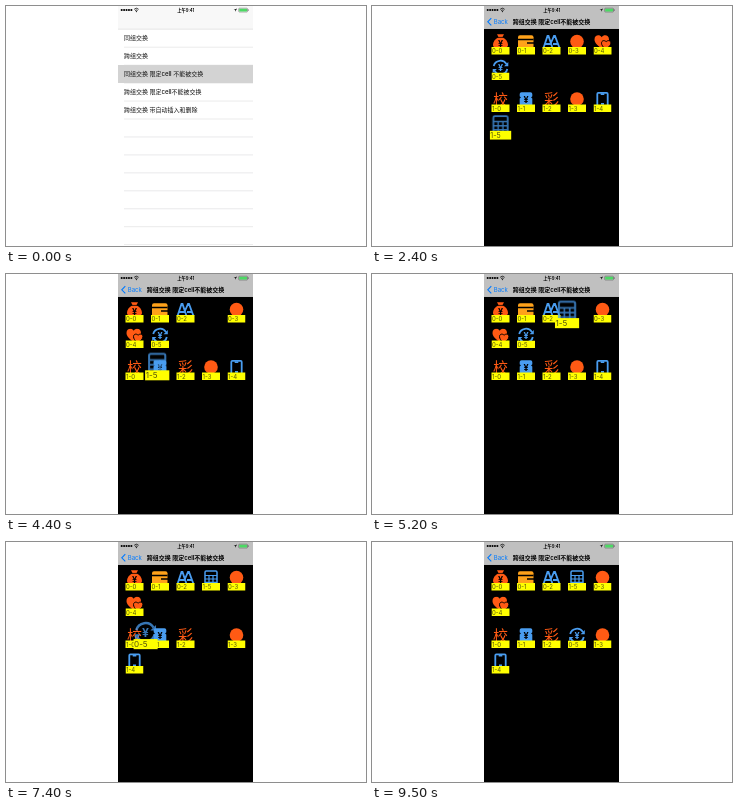
Write an HTML page that moves like this. It is 360x240 px and loops after 9600 ms.

```html
<!DOCTYPE html>
<html lang="zh-Hans">
<head>
<meta charset="utf-8">
<title>Cell reordering</title>
<style>
  html, body { margin: 0; width: 100%; height: 100%; overflow: hidden; background: #fff; }
  body > svg { display: block; width: 360px; height: 240px; }
  text { font-family: Inter, "Noto Sans CJK SC", "Noto Sans CJK", sans-serif; font-size: 6px; }
  .row { font-weight: 500; fill: #111; }
  .title { font-weight: 600; text-anchor: middle; }
  .time { font-size: 4.3px; font-weight: 600; text-anchor: middle; }
  .label { fill: #55550c; }
  .yen { font-size: 9px; font-weight: 700; text-anchor: middle; }
  .glyph { font-size: 15px; font-weight: 500; text-anchor: middle; }
  .orange { fill: #ff5a14; }
  .amber { fill: #ffa21a; }
  .blue { fill: #4a9df0; }
  .line { fill: none; stroke: #4a9df0; stroke-width: 1.8; }

  .list, .page, .bar, .lit, .tapped, .moving, .moving .icon {
    animation: 9.6s linear infinite;
  }
  .lit { animation-name: unlight; }
  .tapped { animation-name: tap; }
  .list { animation-name: leave; }
  .page { animation-name: enter; }
  .bar { animation-name: barIn; }
  @keyframes unlight { 0% { opacity: 1 } 3.1%, 100% { opacity: 0 } }
  @keyframes tap { 0%, 3.1% { opacity: 0 } 3.12%, 100% { opacity: 1 } }
  @keyframes leave {
    0%, 3.65% { transform: none; animation-timing-function: cubic-bezier(.25,.8,.3,1) }
    8.85%, 100% { transform: translate(-40px, 0) }
  }
  @keyframes enter {
    0%, 3.65% { transform: translate(135px, 0); animation-timing-function: cubic-bezier(.25,.8,.3,1) }
    8.85%, 100% { transform: none }
  }
  @keyframes barIn {
    0%, 3.65% { transform: translate(60px, 0); opacity: 0; animation-timing-function: cubic-bezier(.25,.8,.3,1) }
    8.85%, 100% { transform: none; opacity: 1 }
  }

  /* neighbours making room */
  .m03 { animation-name: m03; }
  .m04 { animation-name: m04; }
  .m13 { animation-name: m13; }
  .m14 { animation-name: m14; }
  @keyframes m03 {
    0%, 31.25% { transform: translate(205px, 38px); animation-timing-function: ease-in-out }
    33.85%, 100% { transform: translate(230.5px, 38px) }
  }
  @keyframes m04 {
    0%, 31.25% { transform: translate(230.5px, 38px); animation-timing-function: ease-in-out }
    33.85%, 100% { transform: translate(128.5px, 63.5px) }
  }
  @keyframes m13 {
    0%, 71.35% { transform: translate(205px, 95.5px); animation-timing-function: ease-in-out }
    73.96%, 100% { transform: translate(230.5px, 95.5px) }
  }
  @keyframes m14 {
    0%, 71.35% { transform: translate(230.5px, 95.5px); animation-timing-function: ease-in-out }
    73.96%, 100% { transform: translate(128.5px, 121px) }
  }

  /* dragged cells */
  .m15 { animation-name: m15; }
  .m15 .icon { animation-name: dim15; }
  .m05 { animation-name: m05; }
  .m05 .icon { animation-name: dim05; }
  .m15, .m05 { animation-timing-function: ease-in-out; }
  @keyframes m15 {
    0%, 23.54% { transform: translate(128.5px, 121px) scale(1); animation-timing-function: linear }
    26.15% { transform: translate(128.5px, 121px) scale(1.35) }
    31.25% { transform: translate(198px, 48px) scale(1.35) }
    33.33% { transform: translate(200px, 43px) scale(1.35) }
    37.5% { transform: translate(158px, 60.3px) scale(1.35) }
    41.67% { transform: translate(142px, 48px) scale(1.35) }
    46.88% { transform: translate(152px, 96px) scale(1.35) }
    51.04% { transform: translate(186px, 58px) scale(1.35) }
    54.17%, 55.2% { transform: translate(195px, 40px) scale(1.35) }
    57.3%, 100% { transform: translate(205px, 38px) scale(1) }
  }
  @keyframes dim15 {
    0%, 23.54% { opacity: 1 }
    25%, 55.2% { opacity: .75 }
    57.3%, 100% { opacity: 1 }
  }
  @keyframes m05 {
    0%, 31.25% { transform: translate(128.5px, 63.5px) scale(1) }
    33.85%, 62.5% { transform: translate(154px, 63.5px) scale(1) }
    65.1% { transform: translate(154px, 63.5px) scale(1.35) }
    71.35% { transform: translate(201px, 91px) scale(1.35) }
    72.92% { transform: translate(200px, 95px) scale(1.35) }
    77.08% { transform: translate(139.5px, 93px) scale(1.35) }
    81.77% { transform: translate(152px, 108px) scale(1.35) }
    87.5% { transform: translate(178px, 92px) scale(1.35) }
    91.67%, 93.75% { transform: translate(200px, 95px) scale(1.35) }
    95.83%, 100% { transform: translate(205px, 95.5px) scale(1) }
  }
  @keyframes dim05 {
    0%, 62.5% { opacity: 1 }
    65.1%, 93.75% { opacity: .75 }
    95.83%, 100% { opacity: 1 }
  }
</style>
</head>
<body>
<svg viewBox="0 0 360 240">
  <defs>
    <g id="i00">
      <path class="orange" d="M-3.5-9.8h7l-1.6 3C5.5-5.2 7.5-2 7.5.8 7.5 3.5 5 4.5 0 4.5S-7.5 3.5-7.5.8C-7.5-2-5.5-5.2-1.9-6.8z"/>
      <path d="M-3-6.6h6" stroke="#000" stroke-width=".8"/>
      <text class="yen" y="3">¥</text>
    </g>
    <g id="i01">
      <rect class="amber" x="-8" y="-8.8" width="15.5" height="14" rx="2"/>
      <path d="M-8-4.6H7.5M1-1H8" stroke="#000" stroke-width="1.5"/>
    </g>
    <path id="i02" class="line" d="M-8 4-4-8h1L1 4M-6.5 0h6M-1 0 2.5-8h1L8 4M1.5 0h5"/>
    <circle id="i03" class="orange" cy="-2.5" r="6.8"/>
    <g id="i04">
      <path class="orange" d="M-1.5 4C-5 1.5-8-1.2-8-4.5-8-9-3-10-.8-6.8 1.5-10 6.5-9 6.5-4.5 6.5-1 2 1.5-1.5 4z"/>
      <path class="orange" stroke="#000" d="M3.2 5C.5 3-1 1.2-1-.8-1-3.6 2-4.2 3.6-2.2 5.2-4.2 8.4-3.6 8.4-.8 8.4 1.4 6 3.3 3.2 5z"/>
    </g>
    <g id="i05">
      <path class="line" d="M-6.8-3.5A7 7 0 0 1 6-5.4M6.8-.5A7 7 0 0 1-6 1.5"/>
      <path class="blue" d="M7.8-7.5v4.2H3.6zM-7.8 3.6V-.6h4.2z"/>
      <text class="yen blue" y="1.4">¥</text>
    </g>
    <text id="i10" class="glyph orange" y="3.6">校</text>
    <g id="i11">
      <path class="blue" d="M-4.5-9.3h9a1.8 1.8 0 0 1 1.8 1.8v2.2l-1.2 1.2 1.2 1.2V5H-6.3v-7.9l1.2-1.2-1.2-1.2v-2.2a1.8 1.8 0 0 1 1.8-1.8z"/>
      <text class="yen" y="1.4">¥</text>
    </g>
    <text id="i12" class="glyph orange" y="3.6">彩</text>
    <circle id="i13" class="orange" cy="-2.5" r="6.8"/>
    <g id="i14">
      <rect class="line" x="-5.2" y="-8.6" width="10.4" height="13" rx="1"/>
      <path class="line" d="M-1.8-7.4h3.6M-1.5 2.4h3"/>
    </g>
    <g id="i15">
      <rect class="line" x="-6" y="-9" width="12" height="14" rx="1.2" style="stroke-width:1.5"/>
      <path class="line" d="M-6-4.5H6M-6-1H6M-6 2.3H6M-2-4.5V5M2-4.5V5" style="stroke-width:1.2"/>
    </g>
  </defs>

  <svg x="112" width="135" height="240" viewBox="112 0 135 240">
    <g class="list">
      <rect x="112" width="175" height="240" fill="#fff"/>
      <rect class="lit" x="112" y="59" width="135" height="18" fill="#d3d3d3"/>
      <rect class="tapped" x="112" y="77" width="135" height="18" fill="#d9d9d9"/>
      <g id="rows"></g>
    </g>
    <g class="page">
      <rect x="112" width="135" height="240"/>
      <g id="cells"></g>
    </g>

    <rect x="112" width="135" height="23" fill="#f7f7f7" fill-opacity=".78"/>
    <path d="M112 23.2h135" stroke="#000" stroke-opacity=".25" stroke-width=".4"/>
    <g class="bar">
      <path d="M119.3 12.2 115.8 15.8l3.5 3.6" fill="none" stroke="#007aff" stroke-width="1.1"/>
      <text x="121.8" y="17.9" fill="#007aff">Back</text>
      <text class="title" x="179.5" y="17.9">跨组交换 限定cell不能被交换</text>
    </g>

    <path d="M115.7 4h9.8" stroke="#000" stroke-width="2.1" stroke-linecap="round" stroke-dasharray="0 2.42"/>
    <path d="M128.2 3.3a3.1 3.1 0 0 1 4.4 0M129.2 4.6a1.7 1.7 0 0 1 2.4 0" fill="none" stroke="#000" stroke-width=".8"/>
    <circle cx="130.4" cy="5.6" r=".6"/>
    <text class="time" x="179.8" y="5.6">上午9:41</text>
    <path d="M231 2.4 227.6 4h1.7v1.8z"/>
    <rect x="232.7" y="2.2" width="8.8" height="3.8" rx=".8" fill="none" stroke="#333" stroke-width=".4"/>
    <rect x="233.2" y="2.7" width="7.8" height="2.8" rx=".4" fill="#4cd964"/>
    <path d="M242.3 3.4v1.4" stroke="#333" stroke-width=".6"/>
  </svg>
</svg>
<script>
  const names = ["同组交换", "跨组交换", "同组交换 限定cell 不能被交换",
                 "跨组交换 限定cell不能被交换", "跨组交换 带自动插入和删除"];
  let rows = "";
  for (let i = 0; i < 12; i++) {
    const y = 41.2 + i * 17.95;
    rows += `<path d="M118 ${y}h160" stroke="#d4d4d6" stroke-width=".5"/>`;
    if (names[i]) rows += `<text class="row" x="118" y="${y - 6.9}">${names[i]}</text>`;
  }
  document.getElementById("rows").innerHTML = rows;

  // the dragged cells come last so that they stay on top
  const order = ["00", "01", "02", "03", "04", "10", "11", "12", "13", "14", "05", "15"];
  const moving = ["03", "04", "13", "14", "05", "15"];
  document.getElementById("cells").innerHTML = order.map(id => {
    const [section, item] = id;
    const x = 128.5 + item % 5 * 25.5;
    const y = 38 + section * 57.5 + (item > 4 ? 25.5 : 0);
    const cls = moving.includes(id) ? `moving m${id}` : "";
    return `<g class="${cls}" transform="translate(${x} ${y})">
      <use class="icon" href="#i${id}"/>
      <rect x="-9" y="3" width="18" height="7.5" fill="#ff0"/>
      <text class="label" x="-8.5" y="9">${section}-${item}</text></g>`;
  }).join("");
</script>
</body>
</html>
```
